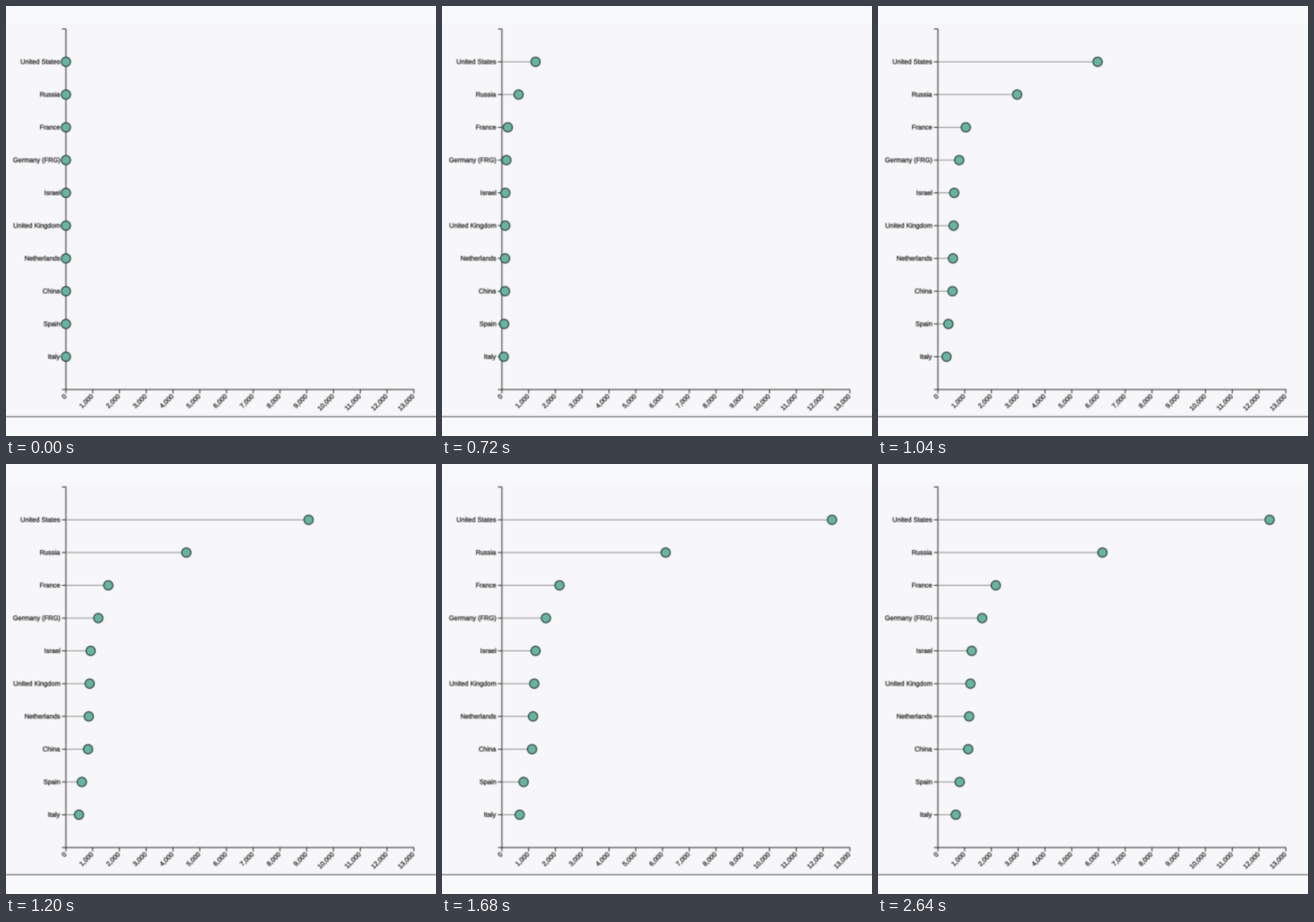
Write a matplotlib script that moves like this. It is 480 px wide and 480 px high and loops after 2720 ms.

```python
import matplotlib.pyplot as plt
import numpy as np
from matplotlib.animation import FuncAnimation
from matplotlib.patches import Circle, PathPatch, Rectangle
from matplotlib.textpath import TextPath
from matplotlib.transforms import Affine2D

SIZE, DPI = 480, 96
PX = 72 / DPI                     # points per pixel
FRAMES, STEP = 34, 80             # 2720 ms loop
START, DURATION = 250, 1600       # ms

X0, Y0 = 66.9, 428.1              # chart origin
TOP = 25.7
UNIT = 29.87 / 1000               # pixels per unit of value
BAND = (Y0 - TOP) / 11
K = 0.74                          # zoom of the whole chart
FONT = 10 * K
INK = "#141414"

DATA = [
    ("United States", 12394), ("Russia", 6148), ("France", 2162),
    ("Germany (FRG)", 1653), ("Israel", 1263), ("United Kingdom", 1214),
    ("Netherlands", 1167), ("China", 1131), ("Spain", 814), ("Italy", 667),
]


def soften(img, dpi):
    """Slight blur over the whole stage."""
    side, mid = 0.2, 0.6
    p = np.pad(img, ((1, 1), (1, 1), (0, 0)), mode="edge")
    p = side * (p[:-2] + p[2:]) + mid * p[1:-1]
    p = side * (p[:, :-2] + p[:, 2:]) + mid * p[:, 1:-1]
    return np.clip(p, 0, 1), 0, 0


fig = plt.figure(figsize=(SIZE / DPI, SIZE / DPI), dpi=DPI, facecolor="#f8f9fb")
ax = fig.add_axes([0, 0, 1, 1])
ax.set_xlim(0, SIZE)
ax.set_ylim(SIZE, 0)
ax.axis("off")
ax.set_agg_filter(soften)


def line(xs, ys, color=INK, width=0.9, z=2):
    return ax.plot(xs, ys, color=color, lw=width * PX, snap=False,
                   solid_capstyle="butt", zorder=z)[0]


def label(x, y, text, angle=0):
    """Text whose baseline ends at (x, y), turned by angle degrees."""
    path = TextPath((0, 0), text, size=FONT, prop={"family": "Liberation Sans"})
    place = (Affine2D().translate(-path.get_extents().x1, 0).scale(1, -1)
             .rotate_deg(-angle).translate(x, y))
    ax.add_patch(PathPatch(place.transform_path(path), fc=INK, ec=INK,
                           lw=0.2 * PX, snap=False, zorder=3))


def ease(t):
    """Cubic in-out."""
    t = min(max(t, 0), 1)
    return 4 * t ** 3 if t < 0.5 else 1 - 4 * (1 - t) ** 3


# Page, panel and the rule below it
ax.add_patch(Rectangle((0, 0), SIZE, SIZE, fc="#f8f9fb", lw=0, zorder=0))
ax.add_patch(Rectangle((0, 20), SIZE, 438, fc="#f7f7f9", lw=0, zorder=1))
line([0, SIZE], [458.4, 458.4], "#555558", 1)

# Axes
tick = 6 * K
x_end = X0 + 13000 * UNIT
line([X0 - tick, X0, X0, X0 - tick], [TOP, TOP, Y0, Y0])
line([X0, X0, x_end, x_end], [Y0 + tick, Y0, Y0, Y0 + tick])
for value in range(0, 13001, 1000):
    x = X0 + value * UNIT
    if 0 < value < 13000:
        line([x, x], [Y0, Y0 + tick])
    label(x + 1.0, Y0 + 8.4, f"{value:,}", 45)

# Lollipops
stems, dots = [], []
for i, (name, _) in enumerate(DATA):
    y = TOP + BAND * (i + 1)
    line([X0 - tick, X0], [y, y])
    label(X0 - 9 * K, y + 0.32 * FONT, name)
    stems.append(line([X0, X0], [y, y], "#808080", 0.85, 4))
    dots.append(ax.add_patch(Circle((X0, y), 7 * K, fc="#69b3a2", ec="#0c1412",
                                    lw=0.9 * PX, snap=False, zorder=5)))


def draw(frame):
    grow = ease((frame * STEP - START) / DURATION)
    for (_, value), stem, dot in zip(DATA, stems, dots):
        x = X0 + value * UNIT * grow
        stem.set_xdata([X0, x])
        dot.center = (x, dot.center[1])
    return stems + dots


anim = FuncAnimation(fig, draw, frames=FRAMES, interval=STEP,
                     repeat=True, repeat_delay=0)
plt.show()
```
